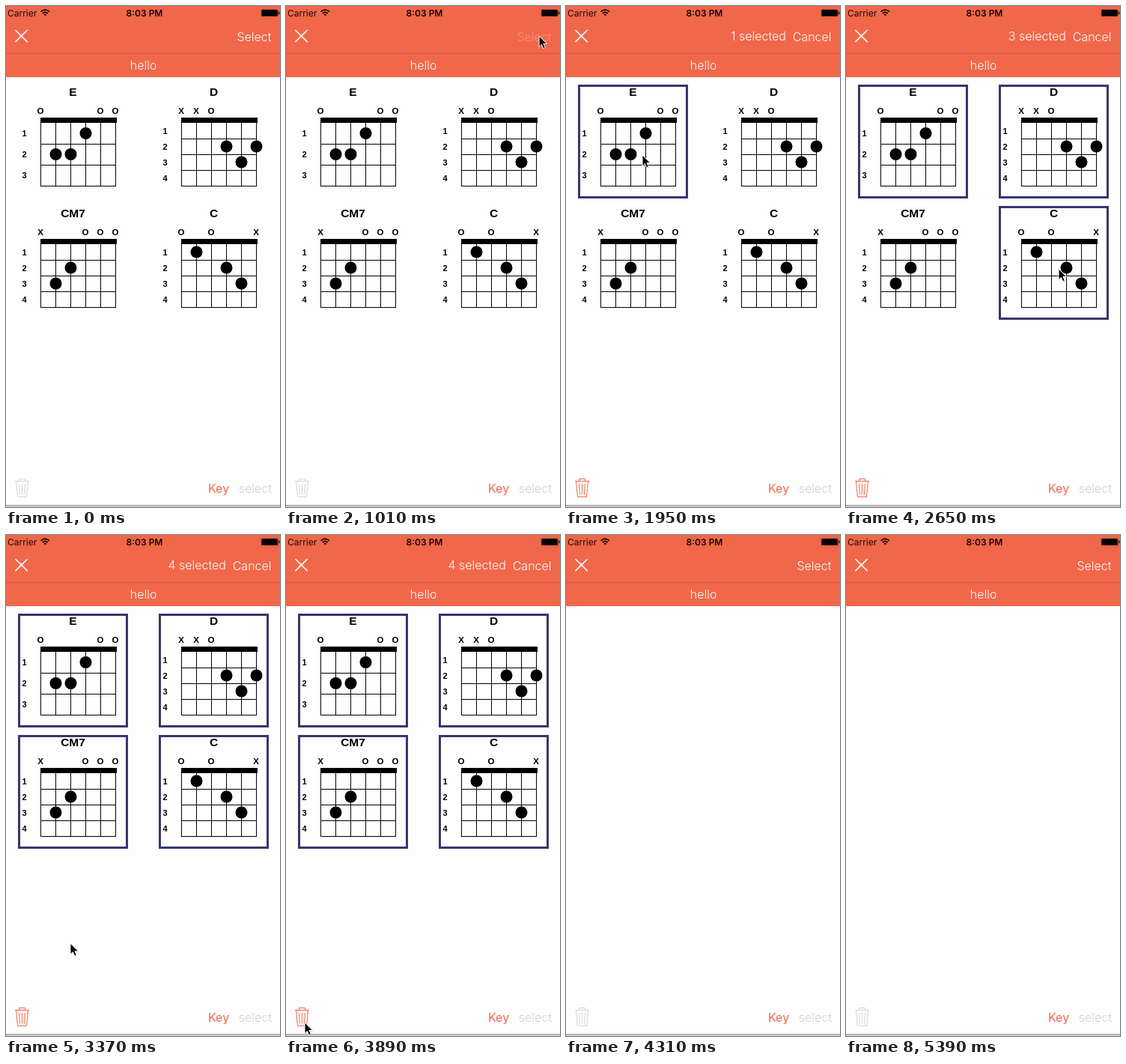
Animation of 366x669 px, one loop 5.45 s. Source, as an HTML page:

```html
<!DOCTYPE html>
<html lang="en">
<head>
<meta charset="utf-8">
<title>Chord list</title>
<style>
html, body { margin: 0; width: 100%; height: 100%; overflow: hidden; background: #fefefe; }
svg { display: block; width: 366px; height: 669px; }
text { font: 300 16px Inter, sans-serif; fill: #fff; }
.end { text-anchor: end; }
.mid { text-anchor: middle; }
.status { font-size: 12px; font-weight: 400; fill: #1c0c08; }
.clock { font-weight: 600; fill: #120704; }
#chords text { font: bold 11px "Liberation Sans", Arial, sans-serif; fill: #000; text-anchor: middle; }
#chords .title { font-size: 15.5px; }
#chords .mark { font-size: 11.5px; }
.grid { stroke: #000; fill: none; }
.frame { fill: none; stroke: #373671; stroke-width: 3; }
.bin { fill: none; stroke-width: 1; }
</style>
</head>
<body>
<svg viewBox="0 0 366 669">
  <defs>
    <path id="bin" d="M12 634.5H31M17.5 634V631.5H25.5V634M13.5 635L15.5 655.5H27.5L29.5 635M17.5 638L18.5 652.5M21.5 638V652.5M25.5 638L24.5 652.5"/>
    <linearGradient id="edge" x2="0" y2="1">
      <stop stop-color="#a9a9a9"/><stop offset="1" stop-color="#d6d6d6"/>
    </linearGradient>
  </defs>
  <rect width="366" height="669" fill="#fefefe"/>
  <rect width="366" height="95" fill="#f16749"/>
  <path d="M0 63.5H366" stroke="#cd573d"/>

  <text class="status" x="2" y="13.5">Carrier</text>
  <g fill="none" stroke="#120704" stroke-width="1.7">
    <path d="M46.6 7.6Q52.3 2.6 58 7.6M48.7 9.9Q52.3 6.7 55.9 9.9"/>
    <path d="M50.3 11.2Q52.3 9.6 54.3 11.2L52.3 13.2z" fill="#120704" stroke="none"/>
  </g>
  <text class="status clock mid" x="185" y="13.5">8:03 PM</text>
  <rect x="341.3" y="5" width="21.6" height="8.6" rx="1.2" fill="#000" stroke="#45190f" stroke-width=".6"/>
  <path d="M364 7.5h1.3v3.6h-1.3z" fill="#120704"/>

  <path d="M12.3 32L28.7 48.2M28.7 32L12.3 48.2" stroke="#fff" stroke-width="1.7"/>
  <text class="end" id="count" x="294" y="46"></text>
  <text class="end" id="select" x="354.5" y="47">Select</text>
  <text class="end" id="cancel" x="354.5" y="47">Cancel</text>
  <text class="mid" x="183.7" y="85">hello</text>

  <g id="chords"></g>

  <use href="#bin" class="bin" id="binOff" stroke="#d6d6d6"/>
  <use href="#bin" class="bin" id="binOn" stroke="#f0694c"/>
  <text x="270" y="650" style="fill:#f16749;font-weight:400">Key</text>
  <text class="end" x="355" y="650" style="fill:#d2d2d2">select</text>
  <rect y="666" width="366" height="3" fill="url(#edge)"/>

  <g id="cursor">
    <path d="M0 0V14.5L3.4 11.4 5.7 16.8 8.3 15.7 6 10.5H10.6z" transform="translate(.6 1.4)" fill="#000" opacity=".18"/>
    <path d="M0 0V14.5L3.4 11.4 5.7 16.8 8.3 15.7 6 10.5H10.6z" fill="#000" stroke="#fff" stroke-width="1"/>
  </g>
</svg>
<script>
const LOOP = 5450, STEP = 58.8, PHASE = 715;
const $ = id => document.getElementById(id);

// marks: one character per string; dots: [string, fret]; pick: time of selection
const chords = [
  { name: 'E', x: 0, y: 0, frets: 3, marks: 'O   OO', dots: [[3, 1], [1, 2], [2, 2]], pick: 1945 },
  { name: 'D', x: 188, y: 0, frets: 4, marks: 'XXO   ', dots: [[3, 2], [5, 2], [4, 3]], pick: 2300 },
  { name: 'CM7', x: 0, y: 162, frets: 4, marks: 'X  OOO', dots: [[2, 2], [1, 3]], pick: 3060 },
  { name: 'C', x: 188, y: 162, frets: 4, marks: 'O O  X', dots: [[1, 1], [3, 2], [4, 3]], pick: 2590 }
];

function drawChord({ name, x, y, frets, marks, dots }) {
  const row = 84 / frets;
  const stringX = s => 46.5 + 20 * s;
  const fretY = f => 156 + row * (f - .5);
  const label = (cls, tx, ty, s) => `<text class="${cls}" x="${tx}" y="${ty}">${s}</text>`;
  let lines = '', out = '';
  for (let s = 0; s < 6; s++) {
    lines += `M${stringX(s)} 150V241`;
    if (marks[s] !== ' ') out += label('mark', stringX(s) - .5, 144, marks[s]);
  }
  for (let f = 1; f <= frets; f++) {
    lines += `M46 ${156.5 + row * f}H147`;
    out += label('', 24.5, fretY(f) + 4, f);
  }
  for (const [s, f] of dots) out += `<circle cx="${stringX(s)}" cy="${fretY(f)}" r="8"/>`;
  return `<g transform="translate(${x} ${y})">
    <rect class="frame" x="17.5" y="106.5" width="144" height="149"/>
    <path class="grid" d="${lines}"/><path d="M46 149H148V156H46z"/>
    ${label('title', 89.5, 120, name)}${out}</g>`;
}
$('chords').innerHTML = chords.map(drawChord).join('');
const frames = document.querySelectorAll('.frame');

// pointer stops: time, x, y
const path = [
  [700, 374, 130], [950, 338, 40], [1240, 338, 40], [1770, 102, 199],
  [2010, 102, 199], [2200, 283, 190], [2320, 283, 190], [2550, 284, 351],
  [2700, 284, 351], [3010, 106, 351], [3180, 106, 351], [3370, 85, 555],
  [3700, 25, 651], [3960, 25, 651], [4070, 30, 690]
];

const ramp = (t, a, b) => Math.min(1, Math.max(0, (t - a) / (b - a)));
const ease = p => p * p * (3 - 2 * p);
const show = (id, v) => $(id).setAttribute('opacity', v);

function pointer(t) {
  let i = 0;
  while (i < path.length - 2 && t >= path[i + 1][0]) i++;
  const [t0, x0, y0] = path[i], [t1, x1, y1] = path[i + 1];
  const raw = ramp(t, t0, t1);
  const p = t0 === 3180 ? raw : t0 === 3370 ? 1 - (1 - raw) ** 2 : ease(raw);
  return [x0 + (x1 - x0) * p, y0 + (y1 - y0) * p];
}

function render(time) {
  const k = Math.floor((time - PHASE) / STEP);
  const t = Math.max(0, PHASE + k * STEP);
  const leave = ramp(t, 3980, 4170);
  const picked = chords.filter(c => t >= c.pick).length;

  const pressed = t >= 970 ? .28 : 1;
  show('select', t < 3900 ? pressed * (1 - ramp(t, 1090, 1250)) : ramp(t, 3980, 4180));
  show('cancel', ramp(t, 1110, 1360) * (1 - leave));
  show('count', ramp(t, 1240, 1440) * (1 - ramp(t, 3980, 4175)));
  $('count').textContent = picked + ' selected';

  const active = ramp(t, 1110, 1250) * (1 - ramp(t, 3980, 4150));
  show('binOn', active);
  show('binOff', 1 - active);

  frames.forEach((f, i) => f.setAttribute('opacity', +(t >= chords[i].pick)));
  show('chords', 1 - ease(ramp(t, 4010, 4310)));

  const [x, y] = pointer(t);
  $('cursor').setAttribute('transform', `translate(${x} ${y})`);
  show('cursor', +(t > 700 && t < 4070));
}

const start = performance.now();
function tick() {
  render((performance.now() - start) % LOOP);
  requestAnimationFrame(tick);
}
tick();
</script>
</body>
</html>
```
